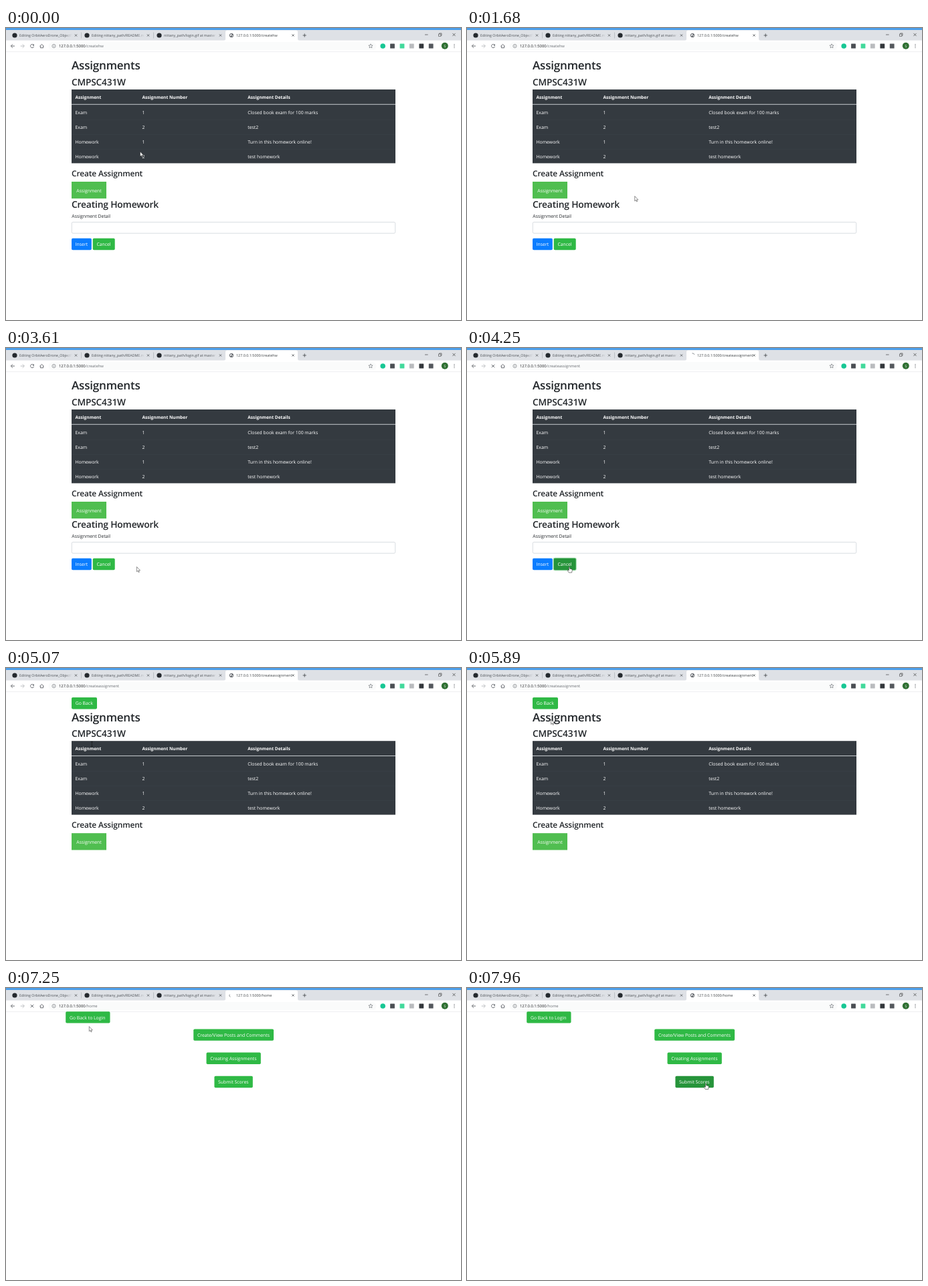
These frames come from a looping animation (680 by 437 pixels, 8 s). An HTML page:

```html
<!DOCTYPE html>
<html lang="en">
<head>
<meta charset="utf-8">
<title>Assignments</title>
<style>
html, body { margin: 0; width: 100%; height: 100%; overflow: hidden; background: #fff; }
svg { display: block; width: 680px; height: 437px; }
text { font-family: "Open Sans", "Noto Sans", sans-serif; text-rendering: geometricPrecision; white-space: pre; }
</style>
</head>
<body>
<svg id="stage" viewBox="0 0 680 437" xmlns="http://www.w3.org/2000/svg">
  <defs>
    <linearGradient id="fade"><stop offset="0" stop-color="#dee1e6" stop-opacity="0"/><stop offset="1" stop-color="#dee1e6"/></linearGradient>
  </defs>
</svg>
<script>
const NS = "http://www.w3.org/2000/svg";
const LOOP = 8000;
const stage = document.getElementById("stage");

function el(parent, tag, attrs, content) {
  const node = document.createElementNS(NS, tag);
  for (const k in attrs) node.setAttribute(k, attrs[k]);
  if (content) node.textContent = content;
  parent.appendChild(node);
  return node;
}
const group = (p, attrs = {}) => el(p, "g", attrs);
const rect = (p, x, y, w, h, fill, rx = 0) => el(p, "rect", { x, y, width: w, height: h, fill, rx });
const dot = (p, cx, cy, r, fill) => el(p, "circle", { cx, cy, r, fill });
const line = (p, d, stroke, w = 0.8) =>
  el(p, "path", { d, stroke, "stroke-width": w, fill: "none", "stroke-linejoin": "round" });
const text = (p, x, y, size, fill, str, weight = 400, spacing = 0) =>
  el(p, "text", { x, y, "font-size": size, fill, "font-weight": weight, "letter-spacing": spacing }, str);
const show = (node, on) => node.setAttribute("visibility", on ? "inherit" : "hidden");

const INK = "#212529", GREY = "#5f6368", GREEN = "#2fb945", DEEP = "#26943a";

function heading(p, y, size, str) {
  text(p, 98, y, size, INK, str, 600, -size * 0.012);
}

function button(p, x, y, w, label, fill = GREEN) {
  const g = group(p);
  const glow = rect(g, x - 1, y - 1, w + 2, 19.4, "#9fdcab", 2.4);
  const face = rect(g, x, y, w, 17.4, fill, 1.8);
  text(g, x + 5.7, y + 11.3, 6.86, "#fff", label);
  show(glow, false);
  return (hover, focus) => {
    face.setAttribute("fill", hover ? DEEP : fill);
    show(glow, focus);
  };
}

// Browser frame
const chrome = group(stage);
rect(chrome, 0, 0, 680, 19, "#dee1e6");
rect(chrome, 0, 0, 680, 3, "#4d9fea");
el(chrome, "path", { d: "M325 19 Q328 19 328 16 V6 Q328 3.5 330.5 3.5 H433.5 Q436 3.5 436 6 V16 Q436 19 439 19 Z", fill: "#fff" });
rect(chrome, 0, 18.6, 680, 16.6, "#fff");
rect(chrome, 0, 35, 680, 0.5, "#dcdfe2");
rect(chrome, 63.5, 21, 490, 12.2, "#fafbfb", 6.1);

const tabs = [
  [0, "Editing OrbitAeroDrone_ObjectT"],
  [108, "Editing nittany_path/README.md"],
  [216, "nittany_path/login.gif at master"]
];
for (const [x, title] of tabs) {
  dot(chrome, x + 13, 11, 3.6, "#24292e");
  text(chrome, x + 20, 12.9, 5.3, "#4a4e53", title);
  rect(chrome, x + 88, 5, 11, 12, "url(#fade)");
  rect(chrome, x + 99, 5, 13, 12, "#dee1e6");
  if (x < 216) rect(chrome, x + 112, 6.5, 0.5, 9, "#9a9ea4");
}
const cross = (x, y, r, color, w) =>
  line(chrome, `M${x - r} ${y - r} l${2 * r} ${2 * r} m0 ${-2 * r} l${-2 * r} ${2 * r}`, color, w);
for (const x of [104.5, 212.5, 320.5, 429]) cross(x, 11, 1.6, "#3c4043", 0.7);
line(chrome, "M443.6 11 h5.2 M446.2 8.4 v5.2", "#3c4043", 0.8);
line(chrome, "M626 10 h4.6", "#222", 0.6);
line(chrome, "M646.5 9 h3.4 v3.4 h-3.4 z M647.6 9 v-1.1 h3.4 v3.4 h-1.1", "#222", 0.5);
cross(669.5, 10, 2.1, "#222", 0.6);

line(chrome, "M13 27 H7.4 M10 24.3 L7.3 27 L10 29.7", GREY, 0.9);
line(chrome, "M21.7 27 H27.3 M24.7 24.3 L27.4 27 L24.7 29.7", "#b5b8bc", 0.9);
line(chrome, "M50.5 27.2 L53.5 24.4 L56.5 27.2 M51.4 26.6 V29.7 H55.6 V26.6", GREY, 0.9);
const reload = group(chrome);
line(reload, "M41.2 25.4 A2.6 2.6 0 1 0 41.6 27.8", GREY, 0.9);
el(reload, "path", { d: "M42 23.9 v2.6 h-2.6 z", fill: GREY });
const stop = line(chrome, "M36.8 24.8 l4.4 4.4 m0 -4.4 l-4.4 4.4", GREY, 0.9);

el(chrome, "circle", { cx: 71.5, cy: 27, r: 2.6, fill: "none", stroke: GREY, "stroke-width": 0.6 });
line(chrome, "M71.5 26.6 v1.8 M71.5 25.3 v0.6", GREY, 0.6);

let star = "";
for (let i = 0; i < 10; i++) {
  const a = i * Math.PI / 5, r = i % 2 ? 1.5 : 3.3;
  star += `${i ? "L" : "M"}${(545 + r * Math.sin(a)).toFixed(2)} ${(27.1 - r * Math.cos(a)).toFixed(2)}`;
}
line(chrome, star + "Z", GREY, 0.6);
dot(chrome, 563.2, 27, 3.8, "#18c794");
const badges = [[577.5, "#4b4f54"], [592, "#42d99b"], [606.3, "#b9bbbe"], [620.8, "#33373b"], [635.2, "#55595e"]];
for (const [x, color] of badges) rect(chrome, x - 3.4, 23.6, 6.8, 6.8, color, 0.5);
dot(chrome, 655.8, 26.8, 5, "#2f7032");
el(chrome, "text", { x: 655.8, y: 28.7, "font-size": 5, fill: "#fff", "text-anchor": "middle" }, "S");
for (const y of [24.7, 27, 29.3]) dot(chrome, 670, y, 0.65, GREY);

const host = "127.0.0.1:5000";
const tabTitle = text(chrome, 344, 12.9, 5.42, "#3c4043", "");
const address = text(chrome, 79, 29.2, 5.85, "#202124", host);
const path = el(address, "tspan", { fill: "#6c7075" });

// Small world icon and the waiting arc
const globe = group(chrome);
dot(globe, 337, 11, 3.1, GREY);
el(globe, "path", { d: "M334.8 10 l2 -1 l1 1 l-1.2 1.2 l-0.4 1.8 l-1 -1.4 z M338 11 l1.4 -0.4 l-0.3 1.6 l-1 0.8 z", fill: "#fff" });
const spinner = line(chrome, "M339.4 9 A3.1 3.1 0 0 1 339.4 13", "#7c8085", 0.8);

// Assignment list, shared by two pages
const list = group(stage);
heading(list, 62.4, 17.05, "Assignments");
heading(list, 85.5, 13.7, "CMPSC431W");
rect(list, 98, 92, 484, 110.4, "#343a40");
rect(list, 98, 113.8, 484, 0.9, "#d5d9dd");
const cols = [103.5, 203.5, 361.3];
const rows = [
  ["Assignment", "Assignment Number", "Assignment Details"],
  ["Exam", "1", "Closed book exam for 100 marks"],
  ["Exam", "2", "test2"],
  ["Homework", "1", "Turn in this homework online!"],
  ["Homework", "2", "test homework"]
];
rows.forEach((row, i) => {
  const y = i ? 106.6 + i * 22 : 106.1;
  row.forEach((cell, j) => text(list, cols[j], y, i ? 6.86 : 6.6, "#fff", cell, i ? 400 : 700));
  if (i > 1) rect(list, 98, 93 + i * 22, 484, 0.4, "#3d444b");
});
heading(list, 222.1, 11.95, "Create Assignment");
rect(list, 98, 230, 52, 25.2, "#50be50");
text(list, 105.3, 245.5, 6.86, "#fff", "Assignment");

const form = group(stage);
heading(form, 269.4, 13.8, "Creating Homework");
text(form, 98.3, 284.3, 6.86, INK, "Assignment Detail");
el(form, "rect", { x: 98.3, y: 290.6, width: 483.4, height: 16.6, rx: 1.7, fill: "#fff", stroke: "#c9cfd5", "stroke-width": 0.7 });
button(form, 98, 314.8, 29.8, "Insert", "#0a7dff");
const cancel = button(form, 129.7, 314.8, 33, "Cancel");

const back = group(stage);
const goBack = button(back, 98, 44, 38, "Go Back");

const home = group(stage);
button(home, 89.2, 35.2, 66.3, "Go Back to Login");
button(home, 280.2, 61.4, 119.8, "Create/View Posts and Comments");
button(home, 299.5, 96.6, 81.3, "Creating Assignments");
const scores = button(home, 311.4, 131.8, 57.4, "Submit Scores");

// Pointers, each with its hot spot at 0,0
const pointer = group(stage);
const shapes = {
  arrow: el(pointer, "path", { d: "M0 0 V7.3 L1.7 5.8 L2.8 8.3 L3.9 7.8 L2.8 5.4 H5.1 Z", fill: "#fff", stroke: "#222", "stroke-width": 0.5 }),
  hand: el(pointer, "path", {
    d: "M-0.7 0.6 Q0 -0.5 0.7 0.6 V3 L3.4 3.6 Q4.4 3.9 4.3 5 L3.6 8.8 H-0.7 L-2.9 5.6 Q-2.6 4.3 -0.7 5.6 Z",
    fill: "#fff", stroke: "#222", "stroke-width": 0.55, "stroke-linejoin": "round"
  }),
  beam: line(pointer, "M-1.5 -3.4 H1.5 M0 -3.4 V3.4 M-1.5 3.4 H1.5", "#111", 0.6)
};

// time, x, y
const moves = [
  [0, 200.5, 185], [680, 200.5, 185], [1460, 248, 245], [1680, 250.7, 251.7],
  [2250, 318, 405], [2400, 328, 408], [2930, 332.3, 352.6], [3150, 310, 328],
  [3850, 153, 327.3], [4800, 153, 327.3], [5050, 128.4, 113.8], [5500, 128, 113],
  [6150, 124.3, 57.6], [7250, 124.3, 57.6], [7850, 357, 142.8], [8000, 357, 142.8]
];
function place(t) {
  let i = 1;
  while (i < moves.length - 1 && t > moves[i][0]) i++;
  const [t0, x0, y0] = moves[i - 1], [t1, x1, y1] = moves[i];
  const u = (t - t0) / (t1 - t0), e = u * u * (3 - 2 * u);
  return [x0 + (x1 - x0) * e, y0 + (y1 - y0) * e];
}

const within = (t, a, b) => t >= a && t < b;

function draw(t) {
  const onForm = t < 4880, onHome = t >= 7130;
  const loading = within(t, 4050, 4880) || within(t, 6350, 7300);
  const page = t < 4050 ? "/createhw" : t < 6350 ? "/createassignment" : "/home";
  show(list, !onHome);
  list.setAttribute("transform", `translate(0 ${onForm ? 0 : 17.2})`);
  show(form, onForm);
  show(back, !onForm && !onHome);
  show(home, onHome);
  show(reload, !loading);
  show(stop, loading);
  show(globe, !loading);
  show(spinner, loading);
  spinner.setAttribute("transform", `rotate(${-60 - (t - 4250) * 0.165} 337 11)`);
  tabTitle.textContent = host + page;
  path.textContent = page;

  const [x, y] = place(t);
  const overCancel = within(t, 3720, 4830), overBack = within(t, 6000, 7130), overScores = t >= 7790;
  cancel(overCancel, t >= 4050 && onForm);
  goBack(overBack, t >= 6350);
  scores(overScores, false);
  const kind = overCancel || overBack || overScores ? "hand" : within(t, 5020, 5680) ? "beam" : "arrow";
  for (const k in shapes) show(shapes[k], k === kind);
  pointer.setAttribute("transform", `translate(${x.toFixed(2)} ${y.toFixed(2)})`);
}

const start = performance.now();
function tick() {
  draw((performance.now() - start) % LOOP);
  requestAnimationFrame(tick);
}
tick();
</script>
</body>
</html>
```
